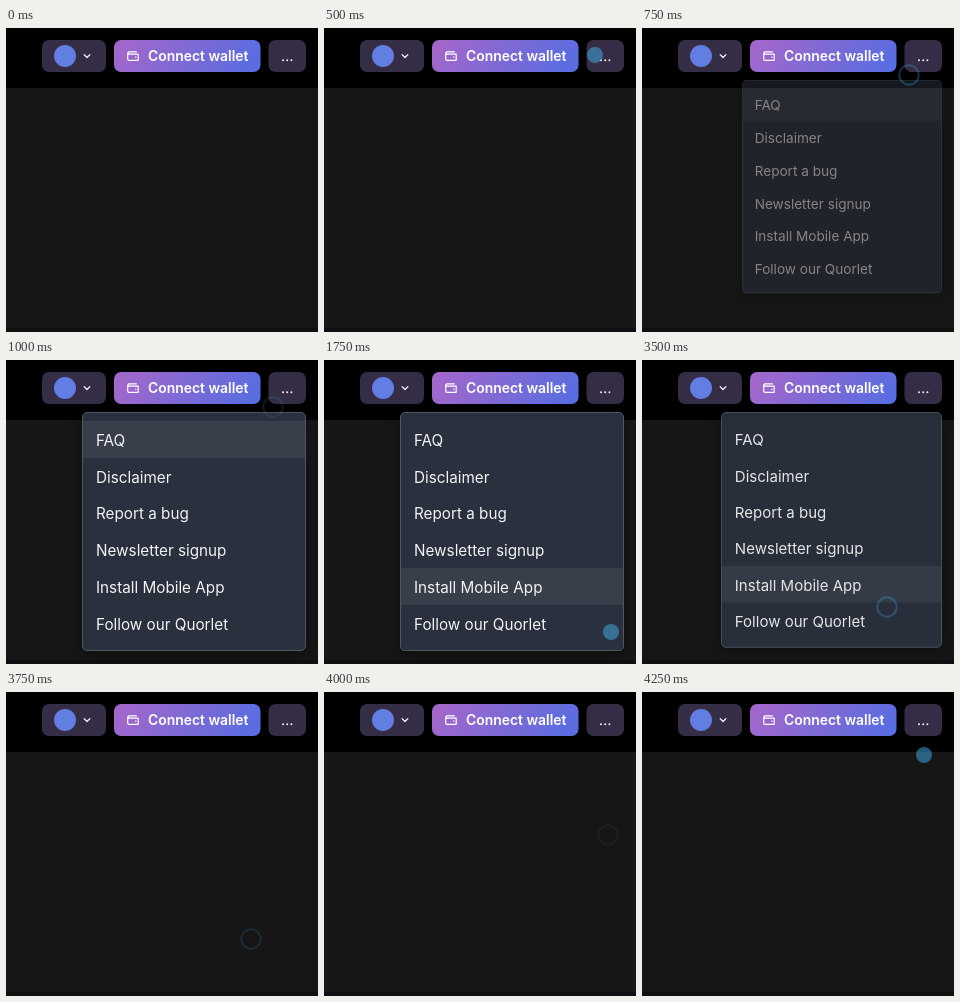
An HTML page for the animation above (4.5 s loop, 312 by 304 pixels).

```html
<!DOCTYPE html>
<html lang="en">
<head>
<meta charset="utf-8">
<style>
  html, body { margin: 0; width: 100%; height: 100%; overflow: hidden; background: #000; }
  svg { display: block; width: 312px; height: 304px; }
  text { font-family: Inter, "Noto Sans", sans-serif; }
  #menu { filter: drop-shadow(0 4px 6px rgba(0, 0, 0, .3)); }
</style>
</head>
<body>
<svg viewBox="0 0 312 304">
  <defs>
    <linearGradient id="glow" gradientUnits="userSpaceOnUse" x1="128" y1="-6" x2="240" y2="62">
      <stop offset="0" stop-color="#a267cb"/>
      <stop offset="1" stop-color="#566de2"/>
    </linearGradient>
  </defs>

  <rect width="312" height="304" fill="#000"/>
  <rect y="60" width="312" height="240" fill="#161616"/>
  <rect y="300" width="312" height="4" fill="#110f12"/>

  <g fill="#352d45">
    <rect x="36" y="12" width="64" height="32" rx="7"/>
    <rect x="262.5" y="12" width="37.5" height="32" rx="7"/>
  </g>
  <circle cx="59" cy="28" r="11" fill="#627ee2"/>
  <path d="M78.2 26.8l2.8 2.7 2.8-2.7" fill="none" stroke="#eee" stroke-width="1.3" stroke-linecap="round" stroke-linejoin="round"/>

  <rect x="108" y="12" width="146.5" height="32" rx="7" fill="url(#glow)"/>
  <g fill="none" stroke="#fff" stroke-width="1.2" stroke-linejoin="round" stroke-linecap="round">
    <path d="M130.4 23.8h-7.5a1.2 1.2 0 0 0 0 2.3h9.3v6.2h-9.2a1.3 1.3 0 0 1-1.3-1.3v-6"/>
    <path d="M129.6 29.2h.3"/>
  </g>
  <text x="142" y="33" font-size="13.9" font-weight="600" fill="#fff">Connect wallet</text>
  <path d="M277 32.2h8.5" stroke="#f0eef3" stroke-width="2" stroke-linecap="round" stroke-dasharray="0 4.2"/>

  <g id="menu">
    <rect x="76.5" y="52.5" width="223" height="238" rx="4.5" fill="#2a303d" stroke="#4d5664"/>
    <rect id="hover" x="77" width="222" height="36.8" fill="#fff" fill-opacity=".065"/>
  </g>
  <circle id="dot" stroke-width="2"/>
</svg>
<script>
const LOOP = 4500, STEP = 250, MOVE = 500, ROW = 36.8, TOP = 61;
const BLUE = 'rgb(68,178,240)';
const $ = id => document.getElementById(id);
const menu = $('menu'), hover = $('hover'), dot = $('dot');
const clamp = v => Math.min(1, Math.max(0, v));

function set(el, attrs) {
  for (const k in attrs) el.setAttribute(k, attrs[k]);
}

const labels = ['FAQ', 'Disclaimer', 'Report a bug', 'Newsletter signup', 'Install Mobile App', 'Follow our Quorlet'];
labels.forEach((label, i) => {
  const t = document.createElementNS('http://www.w3.org/2000/svg', 'text');
  set(t, { x: 90, y: TOP + ROW * i + 24.8, 'font-size': 15.25, fill: '#f2f3f5' });
  t.textContent = label;
  menu.appendChild(t);
});

// Pointer strokes: an optional tap with a pause, then an arc from a through mid to b.
const tap1 = [267, 47], tap2 = [245, 247], turn = [287, 272];
const strokes = [
  { start: 250, pause: 0, a: [262, 19], mid: [271, 27], b: tap1 },
  { start: 750, pause: 500, a: tap1, mid: [282, 211], b: turn },
  { start: 1750, pause: 0, a: turn, mid: [234, 239], b: [249, 227] },
  { start: 3500, pause: 250, a: tap2, mid: [284, 143], b: [282, 63] }
];

// Parabola that meets a, mid and b at u = 0, .5 and 1.
function arc({ a, mid, b }, u) {
  return a.map((p, i) =>
    p * (1 - u) * (1 - 2 * u) + mid[i] * 4 * u * (1 - u) + b[i] * u * (2 * u - 1));
}

function drawMenu(t) {
  const open = clamp((t - 500) / 500);
  const close = clamp((t - 3250) / 500);
  const shown = open * (1 - close ** 4);
  const row = t < 1500 ? 0 : t < 1750 ? 3 : 4;
  set(menu, {
    opacity: shown,
    transform: `translate(300 52) scale(${.784 + .216 * shown}) translate(-300 -52)`
  });
  set(hover, { y: TOP + ROW * row });
}

function drawDot(t) {
  const stroke = strokes.filter(s => s.start <= t).pop();
  if (!stroke) return set(dot, { opacity: 0 });
  const age = t - stroke.start;
  const [cx, cy] = arc(stroke, clamp((age - stroke.pause) / MOVE));
  const ring = stroke.pause > 0 && age <= 500;
  set(dot, {
    cx, cy, r: ring ? 9.7 : 8,
    opacity: ring ? .28 * .5 ** (age / STEP) : .5,
    fill: ring ? 'none' : BLUE,
    stroke: ring ? BLUE : 'none'
  });
}

function draw(now) {
  const t = Math.floor((now % LOOP) / STEP) * STEP;
  drawMenu(t);
  drawDot(t);
}

let start = null;
function tick(now) {
  if (start === null) start = now;
  draw(now - start);
  requestAnimationFrame(tick);
}
draw(0);
requestAnimationFrame(tick);
</script>
</body>
</html>
```
